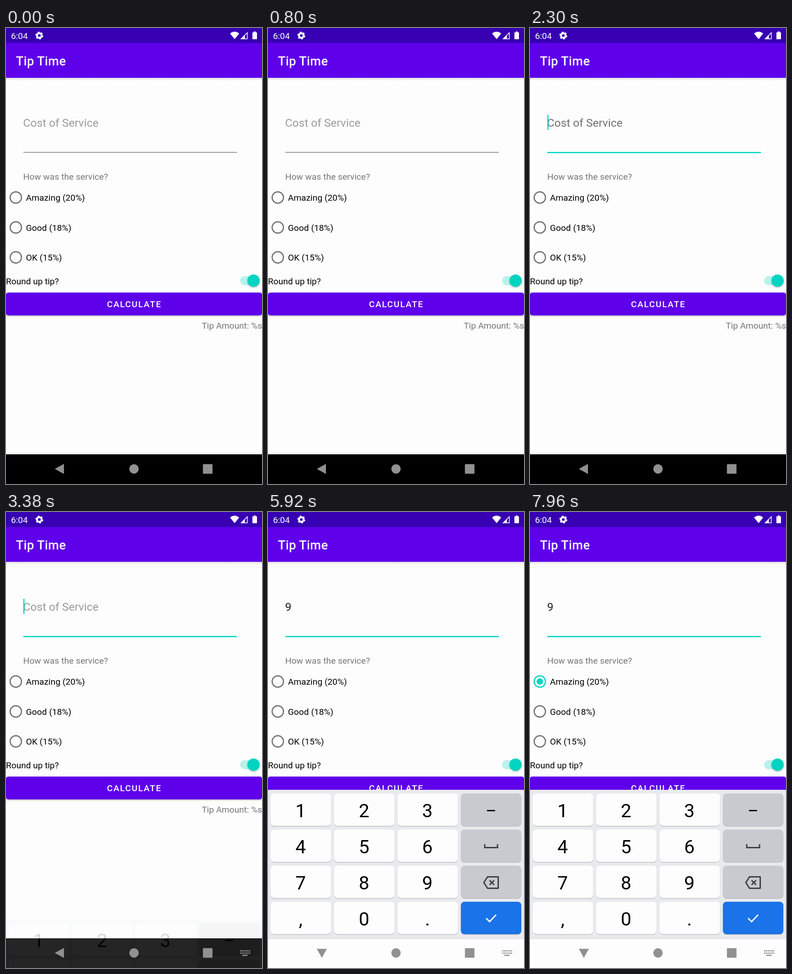
An HTML page that plays this animation: 561x998 px, repeating every 8000 ms.

```html
<!DOCTYPE html>
<html lang="en">
<head>
<meta charset="utf-8">
<title>Tip Time</title>
<style>
  html, body { margin: 0; width: 100%; height: 100%; overflow: hidden; background: #fdfdfd; }
  svg { display: block; width: 100vw; height: 100vh; font: 19.1px Roboto, sans-serif; }
  .medium { font-weight: 500; fill: #fff; }
  .digit { font-size: 41px; text-anchor: middle; }
  .line { fill: none; stroke-width: 3; }
</style>
</head>
<body>
<svg viewBox="0 0 561 998">
  <defs>
    <filter id="shadow" x="-20%" y="-20%" width="140%" height="150%">
      <feDropShadow dx="0" dy="1.5" stdDeviation="1.5" flood-opacity=".3"/>
    </filter>
    <linearGradient id="barShade" x2="0" y2="1">
      <stop stop-color="#000" stop-opacity=".13"/><stop offset="1" stop-color="#000" stop-opacity="0"/>
    </linearGradient>
  </defs>
  <rect width="561" height="998" fill="#fdfdfd"/>

  <!-- Status and app bars -->
  <rect y="109" width="561" height="6" fill="url(#barShade)"/>
  <rect width="561" height="109" fill="#5f00eb"/>
  <rect width="561" height="33" fill="#3700b3"/>
  <text x="11" y="24" fill="#fff">6:04</text>
  <g fill="none" stroke="#fff">
    <circle cx="73" cy="16.5" r="5" stroke-width="4"/>
    <circle cx="73" cy="16.5" r="7.3" stroke-width="2.6" stroke-dasharray="4 3.64"/>
  </g>
  <g fill="#fff">
    <path d="M491 12Q501 4 511 12L501 24.5Z"/>
    <path d="M513.5 24.5L529.5 8.500V24.500ZM523.500 23H528V12.200L523.500 16.700Z" fill-rule="evenodd"/>
    <path d="M543 7.500H547V9.500H550V24.500H540V9.500H543Z"/>
  </g>
  <text class="medium" x="21.8" y="81.500" font-size="27.3" letter-spacing=".34">Tip Time</text>

  <!-- Form -->
  <text id="field" x="37.500" y="216.300" font-size="24.570"></text>
  <rect id="cursor" x="38" y="190" width="2.500" height="33" fill="#06d6c3"/>
  <rect id="underline" x="38" width="468"/>
  <text x="37.700" y="332" fill="#757575" letter-spacing=".08">How was the service?</text>
  <g id="radios"></g>
  <text x="0" y="560.500">Round up tip?</text>
  <rect x="513" y="543" width="38" height="20" rx="10" fill="#b7f2eb"/>
  <circle cx="542.500" cy="553" r="13.500" fill="#06d4c1" filter="url(#shadow)"/>
  <rect y="579" width="561" height="50" rx="5" fill="#5f00eb" filter="url(#shadow)"/>
  <text class="medium" x="221.300" y="611.300" letter-spacing="1.7">CALCULATE</text>
  <text x="561" y="657.500" fill="#757575" text-anchor="end">Tip Amount: %s</text>

  <rect y="933" width="561" height="65"/>
  <g id="keyboard">
    <rect y="608" width="561" height="390" fill="#e8eaed"/>
    <rect y="933" width="561" height="65" fill="#fdfdfd"/>
    <rect y="933" width="561" height="1.500" fill="#dfdfe1"/>
    <g id="keys"></g>
    <rect x="480" y="652" width="17.500" height="3"/>
    <g class="line" stroke="#3c4043">
      <path d="M475 727V734.500H503V727"/>
      <path d="M481 798.500H504.500V823.500H481L473 811Z" stroke-linejoin="round"/>
      <path d="M485.500 806L495.500 816M495.500 806L485.500 816"/>
    </g>
    <path class="line" d="M478 889L485.500 896.500L500 881.500" stroke="#fff"/>
  </g>

  <!-- Navigation icons -->
  <g fill="#919191">
    <path id="back" d="M107 965L127 954V976Z"/>
    <circle cx="280.500" cy="965" r="10.300"/>
    <rect x="431.500" y="954.500" width="21" height="21" rx="1.500"/>
    <path id="switcher" class="line" stroke="#919191" stroke-width="2.500"
      d="M513 960.500H535M513 965.500H535" stroke-dasharray="2.500 1.400"/>
    <rect id="switcherBar" x="517.500" y="969" width="12" height="2.500"/>
  </g>
</svg>
<script>
const LOOP = 8000;
const FOCUS = 2200, RELEASE = 2400, KEYBOARD = 3340, SLIDE = 280;
const INPUT_READY = 3500, TURN = 4050, TYPED = 5200, SELECT = 7150;
const TEAL = '#06d6c3';

const $ = id => document.getElementById(id);
const clamp = x => Math.max(0, Math.min(1, x));
const set = (node, attrs) => {
  for (const name in attrs) node.setAttribute(name, attrs[name]);
  return node;
};
const add = (parent, tag, attrs, text = '') => {
  const node = set(document.createElementNS('http://www.w3.org/2000/svg', tag), attrs);
  node.textContent = text;
  return parent.appendChild(node);
};

const radios = ['Amazing (20%)', 'Good (18%)', 'OK (15%)'].map((label, i) => {
  const cy = 371 + i * 65.5, at = { cx: 21.5, cy };
  const ripple = add($('radios'), 'circle', { ...at, r: 27, fill: TEAL, opacity: 0 });
  const ring = add($('radios'), 'circle', { ...at, r: 12.4, fill: 'none', stroke: '#737373', 'stroke-width': 2.7 });
  const dot = add($('radios'), 'circle', { ...at, r: 0, fill: TEAL });
  add($('radios'), 'text', { x: 43.8, y: cy + 7, 'letter-spacing': '.06' }, label);
  return { ripple, ring, dot };
});

const keyFaces = {};
['123 ', '456 ', '789 ', ',0. '].forEach((row, r) => [...row].forEach((label, c) => {
  const x = 6 + c * 138.9, y = 616 + r * 79;
  const fill = c < 3 ? '#fdfdfd' : r < 3 ? '#c9cacf' : '#1a73e8';
  const box = { x, width: 132.5, height: 71, rx: 8 };
  add($('keys'), 'rect', { ...box, y: y + 1.3, fill: '#b4b6ba' });
  const face = add($('keys'), 'rect', { ...box, y, fill });
  if (c < 3) keyFaces[label] = face;
  add($('keys'), 'text', { x: x + 65.5, y: y + 51.5, class: 'digit' }, label);
}));

function cursorVisible(t) {
  if (t < FOCUS) return false;
  const start = t >= TYPED ? TYPED : t >= INPUT_READY ? INPUT_READY : FOCUS;
  return (t - start) % 1000 < 500;
}

function draw(t) {
  const focused = t >= FOCUS, typed = t >= TYPED;
  $('field').textContent = typed ? '9' : 'Cost of Service';
  const hint = focused && t < RELEASE ? '#707070' : '#9b9b9b';
  set($('field'), { fill: typed ? '#1c1c1c' : hint });
  set($('cursor'), { x: typed ? 51.5 : 38, opacity: +cursorVisible(t) });
  set($('underline'), focused
    ? { y: 271.3, height: 2.7, fill: TEAL }
    : { y: 271.5, height: 1.4, fill: '#737373' });

  const slide = clamp((t - KEYBOARD) / SLIDE);
  set($('keyboard'), { opacity: slide, transform: `translate(0 ${390 * (1 - slide) ** 2})` });
  for (const id of ['switcher', 'switcherBar']) set($(id), { opacity: +(slide > 0) });
  set($('back'), { transform: `rotate(${-90 * clamp((t - TURN) / 200)} 118 965)` });
  set(keyFaces[9], { fill: t >= TYPED - 100 && t < TYPED + 40 ? '#dcdde0' : '#fdfdfd' });

  const chosen = clamp((t - SELECT) / 150), fade = clamp((t - SELECT) / 400);
  const { ripple, ring, dot } = radios[0];
  set(ring, { stroke: chosen > 0 ? TEAL : '#737373' });
  set(dot, { r: 7 * chosen });
  set(ripple, { r: 12 + 15 * chosen, opacity: chosen > 0 ? 0.2 * (1 - fade) : 0 });
}

function frame() {
  draw(performance.now() % LOOP);
  requestAnimationFrame(frame);
}
frame();
</script>
</body>
</html>
```
